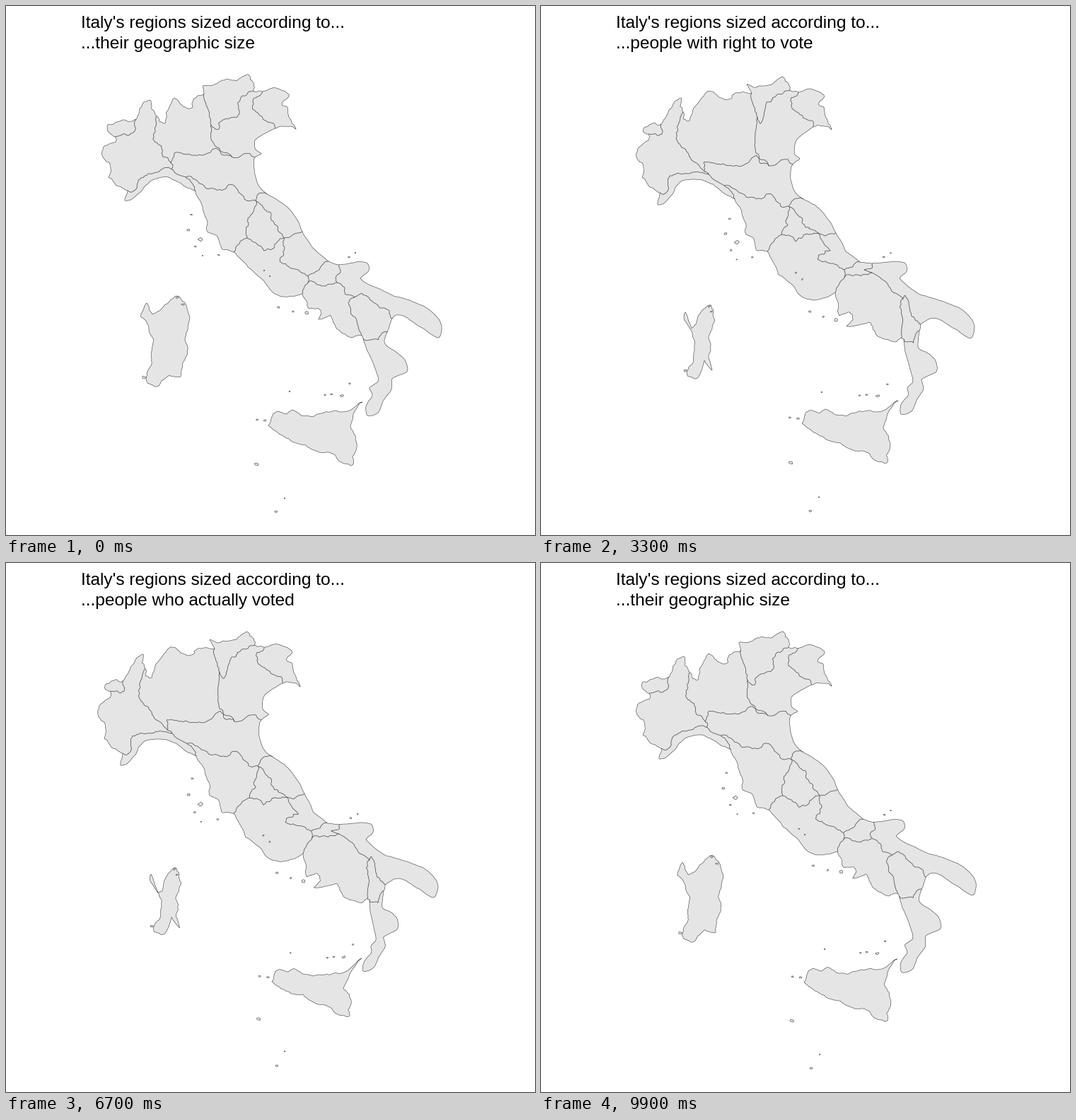
A matplotlib script that plays this animation: 748 px wide and 748 px high, repeating every 10 s.

```python
import numpy as np
import matplotlib.pyplot as plt
from matplotlib.animation import FuncAnimation
from matplotlib.collections import LineCollection, PolyCollection

SIZE, DPI = 748, 100
STEPS = 6
STARTS = (28, 62, 95)
HEAD = "Italy's regions sized according to..."
TAILS = ("...their geographic size",
         "...people with right to vote",
         "...people who actually voted")

rng = np.random.default_rng(7)
pins = {}
borders, islets = [], []


def path(rough, *pts):
    """Points are (x, y), optionally followed by their second and third place."""
    pins.update((p[:2], p[2:]) for p in pts if len(p) > 2)
    line = np.array([p[:2] for p in pts], float)
    for _ in range(3):
        d = np.diff(line, axis=0)
        size = np.hypot(*d.T)[:, None]
        u = np.pad(d / size, ((1, 1), (0, 0)), mode="edge")
        bend = (u[:-2] - u[2:]) * size * .06
        push = rng.uniform(-rough, rough, size.shape)
        mid = line[:-1] + d / 2 + bend + push * np.c_[-d[:, 1], d[:, 0]]
        out = np.empty((len(line) + len(mid), 2))
        out[::2], out[1::2] = line, mid
        line = out
    return line


def border(*pts):
    borders.append(path(.2, *pts))


def isle(size, *p):
    if len(p) > 2:
        pins[p[:2]] = p[2:]
    a = np.linspace(0, 2 * np.pi, 8, endpoint=False)
    r = rng.uniform(.3, .6, (8, 1)) * size
    islets.append(np.array(p[:2]) + r * np.c_[np.cos(a), .7 * np.sin(a)])


ALPS, COAST, SMOOTH = .17, .12, .04

# Points where borders meet the outline
lig_w = (172, 261, 168, 264)
aos_w = (154, 185, 152, 181)
aos_e = (184, 160, 170, 167)
lom_w = (213, 156, 201, 150)
lom_e = (280, 124, 298, 123, 295, 121)
ven_n = (350, 120, 352, 119, 352, 116)
fri_w = (363, 121, 364, 122)
fri_s = (381, 173, 385, 171, 391, 170)
po = (352, 214, 356, 224, 361, 222)
mar_n = (369, 266, 371, 273, 377, 274)
abr_n = (419, 319, 417, 321, 422, 326)
mol_n = (456, 361, 451, 362)
pug_n = (470, 366, 468, 364)
bas_e = (546, 442, 537, 450)
cal_e = (539, 461, 535, 459)
cal_w = (505, 470, 513, 471, 514, 476)
cam_s = (503, 466, 510, 470)
cam_n = (419, 407, 416, 405, 420, 411)
tus_s = (322, 348, 320, 347, 322, 354)
tus_n = (268, 262, 274, 273, 269, 273)

# Points where borders meet inland
emi_w = (233, 222, 231, 234)
lig_n = (235, 231, 237, 238, 235, 241)
tre_s = (290, 168, 306, 157, 302, 154)
ven_s = (320, 214, 322, 226)
tus_w = (254, 242, 259, 254)
umb_n = (354, 276, 351, 284, 357, 288)
umb_w = (341, 328, 340, 323, 344, 332)
umb_e = (393, 328, 392, 321, 397, 331)
mol_w = (427, 382, 429, 373, 432, 379)
mol_s = (427, 391, 429, 384)
mol_e = (468, 391, 468, 377)
bas_n = (493, 412, 512, 414, 514, 420)

piedmont = path(
    ALPS, lig_w, (155, 253), (145, 242, 143, 242, 139, 248), (148, 229),
    (137, 203, 136, 206, 131, 206), (156, 190), aos_w, (144, 168, 146, 172),
    (165, 161), aos_e, (192, 142, 186, 142), (203, 133, 197, 130), (206, 146),
    lom_w)
lombardy = path(
    ALPS, lom_w, (224, 166, 208, 163), (227, 155, 214, 150),
    (238, 130, 237, 120), (246, 138, 246, 124), (264, 143, 270, 130),
    (266, 131), lom_e)
trentino = path(
    ALPS, lom_e, (278, 114, 291, 111), (294, 111, 303, 115),
    (313, 103, 314, 113), (331, 102), (343, 97, 342, 100), (350, 112),
    ven_n, fri_w)
friuli = path(
    COAST, fri_w, (400, 125, 400, 126, 404, 124), (390, 139), (397, 142),
    (399, 153), (410, 174, 411, 175, 416, 175), (402, 170), fri_s)
adriatic = path(
    SMOOTH, fri_s, (352, 190, 360, 192), (353, 203), (361, 209, 366, 216), po,
    (352, 238, 353, 245), (358, 255), mar_n, (391, 279, 387, 281), (411, 301),
    abr_n, (437, 345, 431, 347), mol_n, pug_n)
puglia = path(
    SMOOTH, pug_n, (510, 363, 514, 363, 516, 369), (513, 374),
    (501, 385, 507, 385), (548, 410, 544, 410), (590, 424, 590, 426),
    (616, 452, 613, 453, 611, 457), (612, 469), (593, 458),
    (570, 443, 570, 447), (552, 437, 550, 442), bas_e)
calabria = path(
    SMOOTH, bas_e, cal_e, (535, 475, 533, 482), (554, 491, 549, 492),
    (563, 499), (567, 517, 559, 517, 553, 518), (546, 527, 538, 528),
    (545, 542, 541, 541), (534, 557), (527, 574),
    (511, 579, 509, 577, 505, 577), (509, 566), (518, 551),
    (514, 540, 518, 540), (526, 531), (521, 510), (511, 488), cal_w)
campania = path(
    COAST, cal_w, cam_s, (489, 469, 502, 475), (470, 458, 478, 468),
    (458, 437, 464, 447), (442, 443, 432, 453), (446, 435, 441, 444),
    (442, 428, 436, 433), (429, 428, 422, 438), cam_n)
tuscany = path(
    .07, cam_n, (390, 411, 386, 416), (370, 396, 363, 406),
    (343, 370, 336, 380), (329, 355), tus_s, (305, 343),
    (297, 324, 299, 327), (284, 318, 289, 321), (285, 308),
    (277, 281, 283, 288), tus_n)
liguria = path(
    .07, tus_n, (240, 247, 243, 252), (221, 242, 216, 245, 214, 249),
    (203, 249), (190, 263, 186, 266), (168, 275, 165, 281, 162, 286), lig_w)
mainland = np.vstack([piedmont, lombardy, trentino, friuli, adriatic,
                      puglia, calabria, campania, tuscany, liguria])

west = (371, 593, 369, 590, 376, 592)
sicily = path(
    COAST, west, (382, 574), (396, 577), (405, 571), (418, 579), (441, 577),
    (454, 574, 452, 573, 456, 582), (473, 574),
    (504, 560, 505, 558, 503, 559), (487, 594, 484, 596, 477, 601),
    (496, 624), (490, 637), (490, 649, 489, 646, 485, 641), (474, 645),
    (456, 631), (436, 628), (424, 621, 424, 618, 420, 610), (392, 608), west)

west = (191, 440, 205, 447)
sardinia = path(
    COAST, west, (193, 432, 202, 440), (199, 420, 204, 433, 205, 440),
    (207, 436, 213, 456), (217, 431, 219, 450, 221, 464),
    (229, 420, 225, 434), (241, 410, 238, 423, 238, 431),
    (256, 428, 243, 436), (258, 450, 243, 451), (254, 475, 237, 470),
    (253, 500, 237, 495), (247, 524, 242, 515), (231, 522, 231, 501),
    (220, 530, 226, 518), (213, 538), (200, 533, 207, 523, 209, 521),
    (204, 510, 214, 506), (206, 488, 217, 488, 220, 487),
    (202, 457, 214, 462), west)

isle(7, 275, 330, 277, 334, 275, 341)
isle(3, 262, 295)
isle(4, 258, 317)
isle(3, 268, 340)
isle(3, 301, 352)
isle(2, 278, 353)
isle(2, 365, 374)
isle(2, 373, 382)
isle(4, 385, 426, 380, 432, 383, 438)
isle(3, 406, 432)
isle(6, 425, 434)
isle(3, 485, 355)
isle(2, 494, 349)
isle(2, 401, 545)
isle(3, 451, 550)
isle(3, 460, 549)
isle(5, 475, 551)
isle(3, 486, 534, 490, 535)
isle(3, 355, 585)
isle(4, 366, 586)
isle(6, 354, 648, 353, 646, 357, 645)
isle(2, 394, 696)
isle(4, 382, 715, 381, 714, 383, 711)
isle(5, 195, 525, 204, 515)
isle(4, 242, 412)
isle(4, 250, 422)

border(aos_w, (180, 179, 171, 181), aos_e)
border(lom_w, (212, 170, 194, 168), (209, 184, 192, 182),
       (216, 196, 199, 200), (221, 210, 211, 214), emi_w, lig_n)
border(emi_w, (241, 207, 233, 221), (258, 209), (283, 209, 286, 225), ven_s, po)
border(lom_e, (283, 140, 300, 140), tre_s)
border(tre_s, (290, 187, 303, 193), (302, 202), ven_s)
border(tre_s, (301, 174, 312, 164), (301, 165, 315, 156), (309, 160),
       (327, 157, 319, 136), (330, 148, 326, 134), (333, 128), ven_n)
border(fri_w, (350, 131), (351, 147, 359, 148), (375, 165, 383, 162), fri_s)
border(lig_w, (183, 260, 179, 262), (191, 243, 182, 240), (214, 235), lig_n)
border(lig_n, tus_w, tus_n)
border(tus_w, (280, 254, 288, 267), (309, 259), (319, 253),
       (331, 265, 334, 277), umb_n)
border(umb_n, (355, 268), mar_n)
border(umb_n, (349, 292), (342, 300), (343, 309, 349, 310), umb_w, tus_s)
border(umb_n, (363, 284, 358, 289), (374, 292, 369, 300),
       (380, 309, 374, 313), umb_e)
border(umb_w, (356, 338, 352, 325), (365, 346, 360, 333),
       (379, 342, 372, 323), umb_e)
border(umb_e, abr_n)
border(umb_e, (394, 342, 409, 346), (387, 361, 391, 358),
       (404, 371, 413, 364), mol_w)
border(mol_w, (443, 373, 441, 369), mol_n)
border(mol_w, mol_s, cam_n)
border(mol_s, (446, 396, 447, 380), mol_e)
border(pug_n, (473, 375), (467, 382, 457, 373), mol_e)
border(mol_e, (479, 405, 494, 399), bas_n)
border(bas_n, (507, 409), (523, 421, 522, 432), (541, 430, 530, 445), bas_e)
border(bas_n, (485, 418, 509, 423), (488, 436, 510, 436), (497, 450), cam_s)
border(cal_w, (526, 472), (531, 463), cal_e)


def spread(base, moves, pts):
    """Carry the moves of the pinned points over to all others."""
    base, moves = np.array(base, float), np.array(moves, float)

    def dist(p):
        return np.hypot(*(p[:, None] - base).transpose(2, 0, 1))

    def plane(p):
        return np.c_[np.ones(len(p)), p / SIZE]

    tail = plane(base)
    system = np.block([[dist(base), tail], [tail.T, np.zeros((3, 3))]])
    weights = np.linalg.solve(system, np.vstack([moves, np.zeros((3, 2))]))
    return np.c_[dist(pts), plane(pts)] @ weights


shapes = [mainland, sicily, sardinia] + islets + borders
lands = len(shapes) - len(borders)
cuts = np.cumsum([len(s) for s in shapes])[:-1]

area = np.vstack(shapes)
right = area + spread(list(pins),
                      [np.subtract(q[:2], p) for p, q in pins.items()], area)
full = {p: q for p, q in pins.items() if len(q) > 2}
voted = right + spread(list(full),
                       [np.subtract(q[2:], q[:2]) for q in full.values()], area)
poses = (area, right, voted, area)

fig = plt.figure(figsize=(SIZE / DPI, SIZE / DPI), dpi=DPI, facecolor="white")
ax = fig.add_axes([0, 0, 1, 1])
ax.set(xlim=(0, SIZE), ylim=(SIZE, 0))
ax.axis("off")

land = PolyCollection([], facecolor="#e5e5e5", edgecolor="#404040",
                      linewidth=.42)
inner = LineCollection([], color="#404040", linewidth=.5)
ax.add_collection(land, autolim=False)
ax.add_collection(inner, autolim=False)

font = dict(family="Liberation Sans", size=24.5 * 72 / DPI, color="black",
            va="baseline")
ax.text(106, 31, HEAD, **font)
label = ax.text(106, 60, TAILS[0], **font)


def draw(n):
    pos = sum(min(max((n - s + 1) / STEPS, 0), 1) for s in STARTS)
    i = min(int(pos), 2)
    f = pos - i
    parts = np.split(poses[i] * (1 - f) + poses[i + 1] * f, cuts)
    land.set_verts(parts[:lands])
    inner.set_segments(parts[lands:])
    label.set_text(TAILS[int(pos + .5) % 3])
    return land, inner, label


anim = FuncAnimation(fig, draw, frames=100, interval=100, repeat=True)
plt.show()
```
